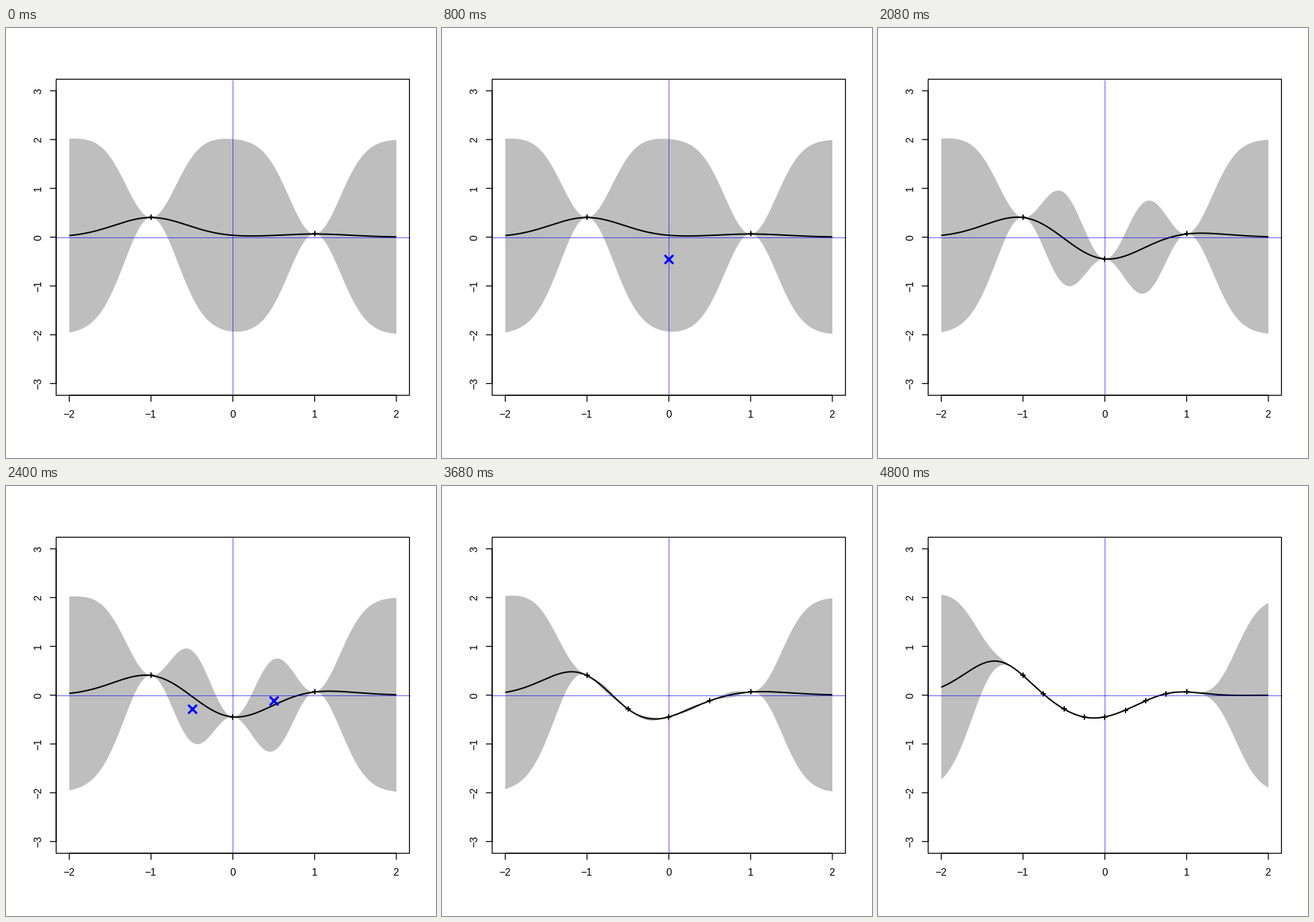
A matplotlib script for the animation above (5.6 s loop, 575 by 575 pixels).

```python
import numpy as np
import matplotlib.pyplot as plt
from matplotlib.animation import FuncAnimation
from matplotlib.markers import MarkerStyle

SIZE = 575
PX = 0.72  # points per pixel at 100 dpi
LEFT, RIGHT, TOP, BOTTOM = 67.1, 539.5, 68.5, 491.2
X0, Y0 = 303.3, 279.7
X_UNIT, Y_UNIT = 109.35, 65.25


def to_x(v):
    return X0 + X_UNIT * np.asarray(v)


def to_y(v):
    return Y0 - Y_UNIT * np.asarray(v)


def kernel(a, b):
    return np.exp(-2.5 * np.subtract.outer(a, b) ** 2)


# Smooth test function: kernels on the sample grid, fitted to a few values.
grid = np.linspace(-1, 1, 9)
knots = np.concatenate([grid, [-2, -1.5, -1.35, -1.2, 1.25, 1.5, 2]])
heights = [0.405, 0.022, -0.285, -0.447, -0.447, -0.305, -0.117, 0.03, 0.065,
           0.16, 0.645, 0.70, 0.635, 0.03, 0.0, 0.0]
coef = np.linalg.lstsq(kernel(knots, grid), heights, rcond=1e-4)[0]
values = kernel(grid, grid) @ coef

xs = np.linspace(-2, 2, 401)


def posterior(idx):
    """Mean and variance of the process given the samples in idx."""
    pts = grid[idx]
    cross = kernel(xs, pts)
    weights = np.linalg.solve(kernel(pts, pts), cross.T).T
    return weights @ values[idx], 1 - np.sum(weights * cross, axis=1)


fig = plt.figure(figsize=(SIZE / 100, SIZE / 100), dpi=100, facecolor="white")
ax = fig.add_axes([0, 0, 1, 1])
ax.set_xlim(0, SIZE)
ax.set_ylim(SIZE, 0)
ax.axis("off")


def line(x, y, width, z, color="black", snap=False):
    return ax.plot(x, y, color=color, lw=width * PX, zorder=z, snap=snap,
                   solid_capstyle="butt", solid_joinstyle="round")[0]


def label(x, y, v, angle=0):
    ax.text(x, y, str(v).replace("-", "\u2212"), family="Liberation Sans",
            fontsize=13.7 * PX, ha="center", va="baseline",
            rotation=angle, rotation_mode="anchor")


def marks(marker, color, size, width, z):
    return ax.plot([], [], ls="", color=color, ms=size * PX, mew=width * PX,
                   marker=MarkerStyle(marker, capstyle="round"),
                   zorder=z, snap=False)[0]


line([LEFT, RIGHT, RIGHT, LEFT, LEFT], [TOP, TOP, BOTTOM, BOTTOM, TOP], 1.25, 5)
line([LEFT, RIGHT], [Y0, Y0], 0.6, 3, "#0000ff", True)
line([X0, X0], [TOP, BOTTOM], 0.6, 3, "#0000ff", True)
for v in range(-2, 3):
    line([to_x(v)] * 2, [BOTTOM, BOTTOM + 8.6], 1.25, 5)
    label(to_x(v) - 0.4, 521.4, v)
for v in range(-3, 4):
    line([LEFT - 8.4, LEFT], [to_y(v)] * 2, 1.25, 5)
    label(47.5, to_y(v), v, 90)
# Axis rules lie on top of the frame.
line(to_x([-2, 2]), [BOTTOM] * 2, 1.25, 5)
line([LEFT] * 2, to_y([-3, 3]), 1.25, 5)

band = ax.fill([0, 1, 1], [0, 0, 1], color="#bebebe", lw=0, zorder=1)[0]
curve = line([], [], 1.9, 2)
known = marks("+", "black", 6, 1.7, 4)
fresh = marks("x", "#0000ff", 9.8, 2.9, 6)


def draw(i):
    step = 8 >> (i // 2)
    seen = np.arange(0, 9, step)
    mean, var = posterior(seen)
    edge_x = np.concatenate([xs, xs[::-1]])
    edge_y = np.concatenate([mean + 2 * var, (mean - 2 * var)[::-1]])
    band.set_xy(np.column_stack([to_x(edge_x), to_y(edge_y)]))
    curve.set_data(to_x(xs), to_y(mean))
    known.set_data(to_x(grid[seen]), to_y(values[seen]))
    # Odd steps announce the midpoints sampled next.
    new = np.arange(step // 2, 9, step) if i % 2 else np.arange(0)
    fresh.set_data(to_x(grid[new]), to_y(values[new]))
    return band, curve, known, fresh


anim = FuncAnimation(fig, draw, frames=7, interval=800, repeat=True,
                     repeat_delay=0, init_func=lambda: draw(0))
plt.show()
```
